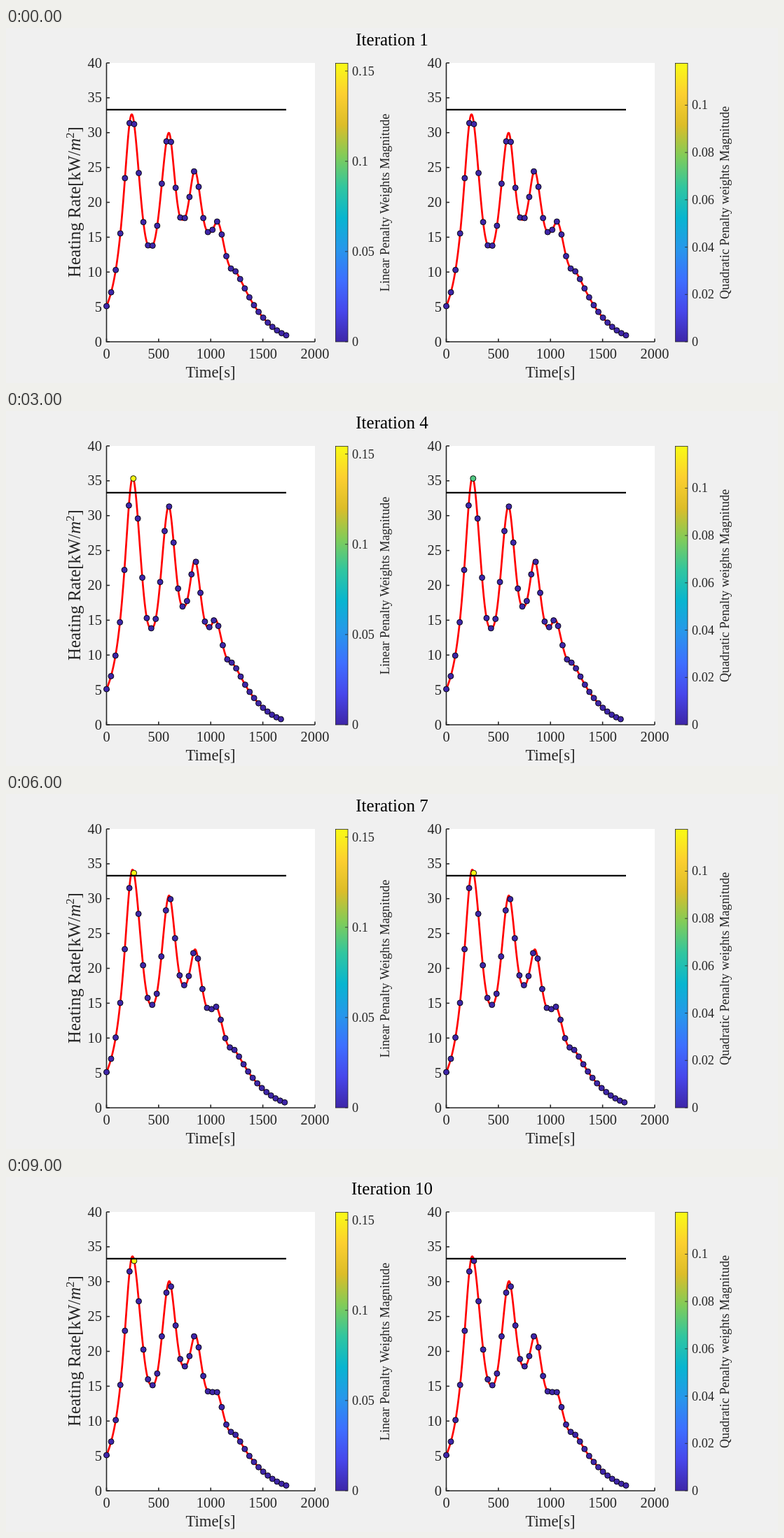
Recreate the animation shown at these times as an HTML page with a canvas. Size 1102 by 508 pixels, loop 10000 ms.

```html
<!DOCTYPE html>
<html lang="en">
<head>
<meta charset="utf-8">
<title>Heating rate iterations</title>
<style>
html, body { margin: 0; width: 100%; height: 100%; overflow: hidden; background: #f0f0f0; }
canvas { display: block; }
</style>
</head>
<body>
<canvas id="stage" width="1102" height="508"></canvas>
<script>
const ctx = document.getElementById('stage').getContext('2d');
const SERIF = '"Liberation Serif", "Times New Roman", serif';
const INK = '#262626';
const LEFT = 143.5, TOP = 50, BOTTOM = 449, WIDTH = 297.5, SHIFT = 485;
const START = 51, LIMIT = 116.8, NODES = 40, ROUNDS = 10;

// Each profile: peaks and troughs in turn, then the shoulder where the tail starts.
const first = { end: 400, keys: [[179.5, 325.5], [206, 135.5], [232.5, 299], [252, 174.5],
  [269.5, 245], [290, 156.5], [301.5, 172], [325, 103]] };
const second = { end: 399, keys: [[181, 339], [208.5, 140], [232, 299], [252, 174.5],
  [269, 238], [290, 152], [299, 161], [325, 96]] };
const third = { end: 390, keys: [[181, 359.5], [207, 134], [232, 317], [253, 166],
  [269.5, 240], [288.5, 139], [298, 154], [321, 91]] };
const last = { end: 400, keys: [[180.5, 335.5], [208.5, 151], [233, 300], [254.5, 178],
  [270, 223], [291, 141], [300, 142], [323, 84]] };

const lerp = (a, b, t) => a + (b - a) * t;
const smooth = t => t * t * (3 - 2 * t);

function blend(a, b, t) {
  return {
    end: lerp(a.end, b.end, t),
    keys: a.keys.map((p, i) => p.map((v, j) => lerp(v, b.keys[i][j], t)))
  };
}

// After the third round the profile settles towards the last one.
function profile(n) {
  if (n < 2) return [first, second][n];
  return blend(third, last, 1 - (1 - (n - 2) / 7) ** 1.8);
}

// Height above the time axis at screen position x.
function height({ keys, end }, x) {
  const [px, ph] = keys[0], [sx, sh] = keys[keys.length - 1];
  if (x <= px) {
    const far = ((px - x) / (px - LEFT)) ** 2;
    return ph / (1 + far * (ph / START - 1));
  }
  if (x >= sx) {
    const u = (end - x) / (end - sx);
    return sh * (.09 + .28 * u + .63 * u * u + 1.2 * u ** 8 * (1 - u));
  }
  const i = keys.findIndex(k => k[0] > x);
  const [low, high] = [keys[i - 1], keys[i]].sort((a, b) => a[1] - b[1]);
  const t = (x - low[0]) / (high[0] - low[0]);
  return lerp(low[1], high[1], smooth(t ** 1.3));
}

const ramp = ['#3e26a8', '#4747eb', '#3e6fff', '#2797eb', '#08b5d0', '#31c69f', '#81cc59', '#dcbd29', '#fccf30', '#f9fb15'];

function rampColor(v) {
  const pos = v * (ramp.length - 1), i = Math.min(ramp.length - 2, Math.floor(pos));
  const channel = (hex, c) => parseInt(hex.slice(1 + 2 * c, 3 + 2 * c), 16);
  return `rgb(${[0, 1, 2].map(c => Math.round(lerp(channel(ramp[i], c), channel(ramp[i + 1], c), pos - i)))})`;
}

// Colour of the node at the first peak, as a share of the colour scale.
const linearWeight = n => n < 2 ? 0 : n === 2 ? .46 : 1;
const squareWeight = n => n < 2 || n > 6 ? 0 : Math.min(1, .14 + .46 * (n - 2));

function text(str, x, y, size, align = 'center', color = INK) {
  ctx.font = `${size}px ${SERIF}`;
  ctx.textAlign = align;
  ctx.fillStyle = color;
  ctx.fillText(str, x, y);
}

function line(points, width, color) {
  ctx.beginPath();
  points.forEach(([x, y]) => ctx.lineTo(x, y));
  ctx.lineWidth = width;
  ctx.strokeStyle = color;
  ctx.stroke();
}

function upright(x, y, paint) {
  ctx.save();
  ctx.translate(x, y);
  ctx.rotate(-Math.PI / 2);
  paint();
  ctx.restore();
}

function rateLabel() {
  const parts = [['Heating Rate[kW/', '', 24.8, 0], ['m', 'italic ', 24.8, 0], ['2', '', 17, -9], [']', '', 24.8, 0]];
  const setFont = ([, style, size]) => { ctx.font = `${style}${size}px ${SERIF}`; };
  const widths = parts.map(p => { setFont(p); return ctx.measureText(p[0]).width; });
  let x = -widths.reduce((a, b) => a + b) / 2;
  ctx.textAlign = 'left';
  ctx.fillStyle = INK;
  parts.forEach((p, i) => {
    setFont(p);
    ctx.fillText(p[0], x, p[3]);
    x += widths[i];
  });
}

function axes() {
  ctx.fillStyle = '#fff';
  ctx.fillRect(LEFT, TOP, WIDTH, BOTTOM - TOP);
  line([[LEFT, TOP], [LEFT, BOTTOM], [LEFT + WIDTH, BOTTOM]], 1.6, INK);
  for (let v = 0; v <= 40; v += 5) {
    const y = BOTTOM - v * (BOTTOM - TOP) / 40;
    line([[LEFT, y], [LEFT + 4.5, y]], 1.6, INK);
    text(v, 137, y + 6.5, 20.4, 'right');
  }
  for (let v = 0; v <= 2000; v += 500) {
    const x = LEFT + v * WIDTH / 2000;
    line([[x, BOTTOM], [x, BOTTOM - 4.5]], 1.6, INK);
    text(v, x, 473, 20.4);
  }
  text('Time[s]', 292, 500, 22.7);
}

function colorbar(label, max, gap) {
  const x = 470.5, y = TOP + .5, w = 17.5, h = BOTTOM - y;
  const grad = ctx.createLinearGradient(0, BOTTOM, 0, y);
  ramp.forEach((c, i) => grad.addColorStop(i / (ramp.length - 1), c));
  ctx.fillStyle = grad;
  ctx.fillRect(x, y, w, h);
  ctx.lineWidth = .8;
  ctx.strokeStyle = INK;
  ctx.strokeRect(x, y, w, h);
  for (let k = 0; k * gap < max; k++) {
    const tick = BOTTOM - k * gap / max * h;
    line([[x + w - 4, tick], [x + w, tick]], .8, INK);
    text(+(k * gap).toFixed(2), 494, tick + 6, 18.3, 'left');
  }
  upright(547, 250, () => text(label, 0, 0, 18.25));
}

function series(n, weight) {
  const curve = profile(n);
  // In the second round the nodes still lie on the first profile.
  const base = n === 1 ? first : curve;
  const path = [];
  for (let x = LEFT; x <= curve.end; x += .5) path.push([x, BOTTOM - height(curve, x)]);
  ctx.lineJoin = 'round';
  line(path, 2.7, '#f00');
  for (let i = 0; i < NODES; i++) {
    const x = lerp(LEFT, curve.end, i / (NODES - 1));
    ctx.beginPath();
    ctx.arc(x, BOTTOM - height(base, x), 4, 0, Math.PI * 2);
    ctx.fillStyle = rampColor(i === 6 ? weight : 0);
    ctx.fill();
    ctx.lineWidth = .9;
    ctx.strokeStyle = '#000';
    ctx.stroke();
  }
  line([[LEFT, LIMIT], [400, LIMIT]], 2.2, '#000');
}

function panel(offset, label, max, gap, n, weight) {
  ctx.save();
  ctx.translate(offset, 0);
  axes();
  colorbar(label, max, gap);
  series(n, weight);
  ctx.restore();
}

function draw() {
  const n = Math.floor(performance.now() / 1000) % ROUNDS;
  ctx.fillStyle = '#f0f0f0';
  ctx.fillRect(0, 0, 1102, 508);
  text(`Iteration ${n + 1}`, 551, 25, 25, 'center', '#000');
  upright(106, 249, rateLabel);
  panel(0, 'Linear Penalty Weights Magnitude', .1543, .05, n, linearWeight(n));
  panel(SHIFT, 'Quadratic Penalty weights Magnitude', .1177, .02, n, squareWeight(n));
  requestAnimationFrame(draw);
}
draw();
</script>
</body>
</html>
```
